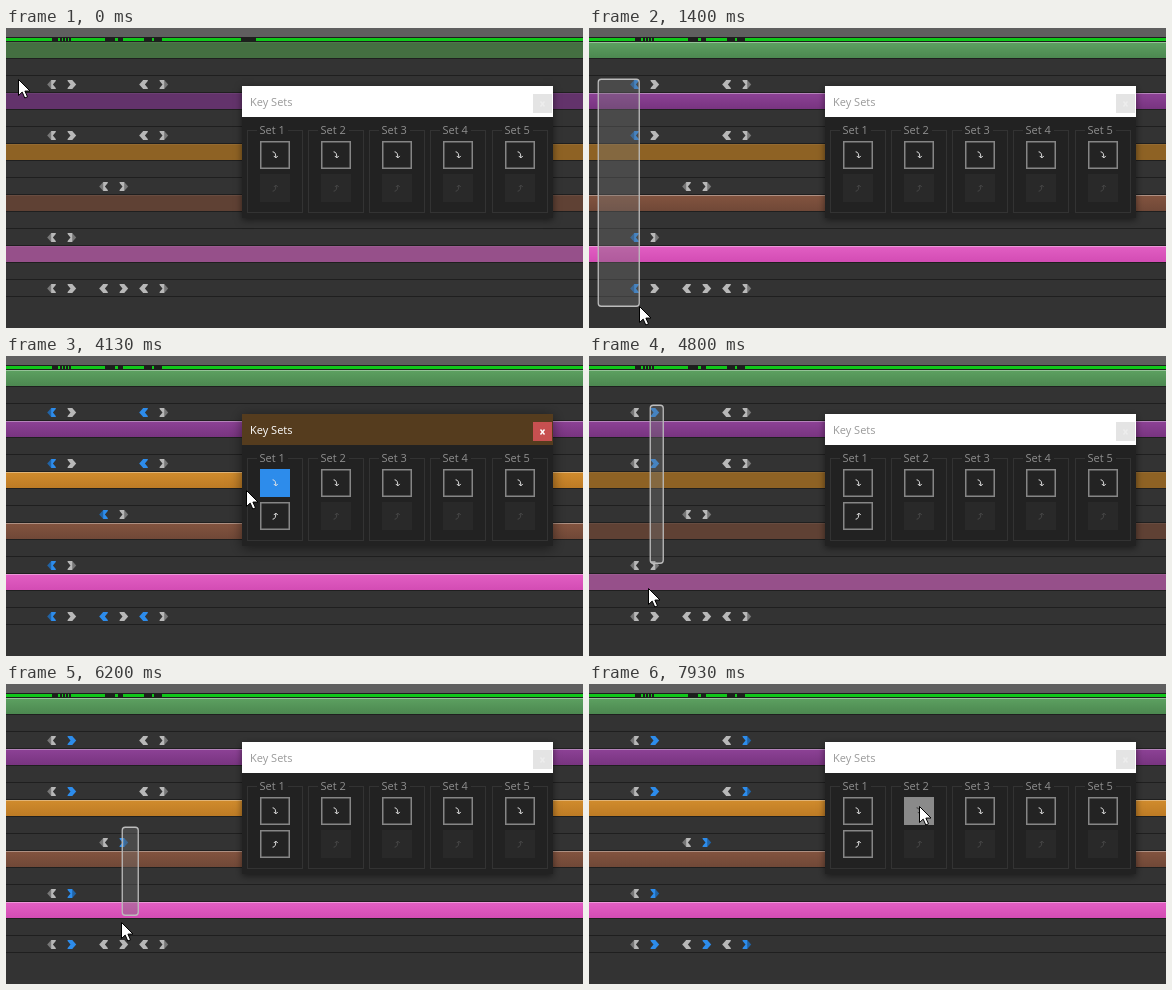
These frames come from a looping animation (577 px wide and 300 px high, 8000 ms). An HTML page with a canvas:

```html
<!DOCTYPE html>
<html lang="en">
<head>
<meta charset="utf-8">
<title>Key Sets</title>
<style>
html, body { margin: 0; width: 100%; height: 100%; overflow: hidden; background: #333; }
canvas { display: block; }
</style>
</head>
<body>
<canvas id="stage" width="577" height="300"></canvas>
<script>
const ctx = document.getElementById('stage').getContext('2d');
const LOOP = 8000, STEP = 1000 / 15, LAG = 40;
const PRESS = 3925, CLEAR = 4460;
const BLUE = '#2d8ceb', FONT = '11px "Open Sans", "Noto Sans", sans-serif';

// Three in/out key pairs; each layer uses some of them
const PAIRS = [[46, 65], [98, 117], [138, 157]];
const layer = (dim, top, bottom, ...pairs) =>
  ({ dim, top, bottom, keys: pairs.flatMap(p => PAIRS[p]) });
const LAYERS = [
  layer('#446f41', '#5da161', '#4c8850', 0, 2),
  layer('#63336b', '#8d4296', '#783480', 0, 2),
  layer('#8e6224', '#d18c2d', '#bd7b25', 1),
  layer('#5f4134', '#83543f', '#704837', 0),
  layer('#96508a', '#e25fc3', '#d34cb4', 0, 1, 2)
];

// Eased cursor moves; a drag also holds a marquee until its release
const move = (from, to, x, y, release) => ({ from, to, x, y, release });
const MOVES = [
  move(130, 330, 9, 51), move(330, 1300, 50, 278, 1470),
  move(1470, 1700, 86, 142), move(1700, 1930, 110, 274, 2195),
  move(2200, 2480, 124, 51), move(2480, 2933, 138, 271, 3065),
  move(3070, 3750, 267, 128), move(3930, 4133, 240, 134),
  move(4133, 4333, 74, 49), move(4467, 4930, 56, 276, 5000),
  move(5000, 5400, 142, 161), move(5400, 5600, 132, 143),
  move(5600, 6467, 110, 266, 6660), move(6667, 6880, 179, 278),
  move(6880, 7067, 151, 103, 7530), move(7080, 7400, 151, 42),
  move(7530, 7800, 360, 105), move(7800, 7930, 330, 122)
];
const DRAGS = MOVES.filter(m => m.release);

function cursorAt(t) {
  let x = 12, y = 51;
  for (const m of MOVES) {
    if (t <= m.from) break;
    const p = Math.min(1, (t - m.from) / (m.to - m.from));
    const k = p * p * (3 - 2 * p);
    x += (m.x - x) * k;
    y += (m.y - y) * k;
  }
  return [x, y];
}

function dragBox({ from, release }, t) {
  const [x, y] = cursorAt(from);
  const [u, v] = cursorAt(Math.max(from, Math.min(t, release) - LAG));
  return { x0: Math.min(x, u), x1: Math.max(x, u), y0: Math.min(y, v), y1: Math.max(y, v) };
}

function rect(x, y, w, h, fill) {
  ctx.fillStyle = fill;
  ctx.fillRect(x, y, w, h);
}

function frame(x, y, w, h, color, line = 1) {
  ctx.strokeStyle = color;
  ctx.lineWidth = line;
  ctx.strokeRect(x + line / 2, y + line / 2, w - line, h - line);
}

function poly(points, fill) {
  ctx.beginPath();
  points.forEach(([x, y]) => ctx.lineTo(x, y));
  ctx.closePath();
  ctx.fillStyle = fill;
  ctx.fill();
}

function drawKey(x, y, flip, outer, lit) {
  const bright = lit ? BLUE : '#b8b8b8', dim = lit ? '#2163a5' : '#777';
  ctx.save();
  ctx.translate(x + .2, y + .5);
  if (flip) ctx.scale(-1, 1);
  poly([[-5, 0], [-1, -4.5], [0, -4.5], [0, 4.5], [-1, 4.5]], outer ? dim : bright);
  poly([[-1, -4.5], [3.6, -4.5], [3.6, -3.5], [.7, 0], [3.6, 3.5], [3.6, 4.5], [-1, 4.5]], bright);
  ctx.restore();
}

function drawRuler(t) {
  const gap = (x, w) => rect(x, 10, w, 4, '#1c201c');
  rect(0, 0, 577, 9, '#5f5f5f');
  rect(0, 9, 577, 5, '#1e1e1e');
  rect(0, 10, 577, 3, '#10c81a');
  gap(46, 6);
  for (let x = 54; x < 65; x += 3) gap(x, 2);
  gap(99, 10);
  gap(112, 5);
  gap(138, 8);
  gap(148, 8);
  if (t < 400) gap(235, 15);
}

function drawLayers(boxes) {
  rect(0, 14, 577, 286, '#333');
  LAYERS.forEach(({ dim, top, bottom, keys }, row) => {
    const y = 14 + 51 * row, ky = y + 42;
    const lit = keys.map(x => boxes.some(b =>
      x >= b.x0 && x - 2 <= b.x1 && ky >= b.y0 && ky <= b.y1));
    const on = lit.includes(true);
    let fill = dim;
    if (on) {
      fill = ctx.createLinearGradient(0, y, 0, y + 16);
      fill.addColorStop(0, top);
      fill.addColorStop(1, bottom);
    }
    rect(0, y, 577, 16, fill);
    rect(0, y, 577, 1, `rgba(255,255,255,${on ? .35 : .06})`);
    for (let d = 16; d < 51; d += 17) rect(0, y + d, 577, 1, '#1f1f1f');
    keys.forEach((x, i) => drawKey(x, ky, i % 2, i === 0 || i === keys.length - 1, lit[i]));
  });
}

function drawMarquee({ x0, y0, x1, y1 }) {
  ctx.beginPath();
  ctx.roundRect(Math.round(x0) + .25, Math.round(y0) + .25,
    Math.round(x1 - x0), Math.round(y1 - y0), 3);
  ctx.fillStyle = 'rgba(115,115,115,.36)';
  ctx.fill();
  ctx.strokeStyle = '#bcbcbc';
  ctx.lineWidth = 1.3;
  ctx.stroke();
}

function drawArrow(x, y, up, color) {
  ctx.save();
  ctx.translate(x, y);
  ctx.scale(.8, up ? -.8 : .8);
  ctx.strokeStyle = color;
  ctx.lineWidth = 1.2;
  ctx.beginPath();
  ctx.moveTo(-3, -4);
  ctx.quadraticCurveTo(1, -4, 1, 3);
  ctx.moveTo(-1.5, 1.2);
  ctx.lineTo(1, 3.7);
  ctx.lineTo(3.5, 1.2);
  ctx.stroke();
  ctx.restore();
}

function drawButton(x, y, up, enabled, pressed, [cx, cy]) {
  const hover = cx >= x && cx < x + 30 && cy >= y && cy < y + 28;
  rect(x, y, 30, 28, !enabled ? '#292929' : pressed ? BLUE : hover ? '#8a8a8a' : '#232323');
  if (enabled && !pressed && !hover) frame(x, y, 30, 28, '#868686', 1.5);
  drawArrow(x + 15, y + 14, up, !enabled ? '#484848' : hover && !pressed ? '#333' : '#e4e4e4');
}

function drawPanel(t, cursor) {
  const active = t >= PRESS && t < CLEAR;
  ctx.save();
  ctx.shadowColor = 'rgba(0,0,0,.5)';
  ctx.shadowBlur = active ? 12 : 7;
  ctx.shadowOffsetY = 2;
  rect(236, 58, 311, 132, '#222');
  ctx.restore();
  rect(236, 58, 311, 31, active ? '#553c1e' : '#fff');
  rect(527, 66, 19, 19, active ? '#c75050' : '#e4e4e4');
  ctx.strokeStyle = active ? '#fff' : '#ededed';
  ctx.lineWidth = 1.4;
  ctx.beginPath();
  ctx.moveTo(534.5, 73.5); ctx.lineTo(538.5, 78.5);
  ctx.moveTo(538.5, 73.5); ctx.lineTo(534.5, 78.5);
  ctx.stroke();

  ctx.font = FONT;
  ctx.fillStyle = active ? '#fff' : '#999';
  ctx.fillText('Key Sets', 244, 78);

  for (let i = 0; i < 5; i++) {
    const x = Math.floor(241 + 61.3 * i);
    frame(x, 102, 56, 83, '#333');
    rect(x + 10, 100, 31, 5, '#222');
    ctx.fillStyle = '#909090';
    ctx.fillText('Set ' + (i + 1), x + 12.5, 106);
    drawButton(x + 13, 113, false, true, i === 0 && active, cursor);
    drawButton(x + 13, 146, true, i === 0 && t >= PRESS, false, cursor);
  }
}

function drawCursor([x, y]) {
  ctx.save();
  ctx.translate(Math.round(x) + .5, Math.round(y) + .5);
  poly([[0, 0], [0, 16], [3.7, 12.6], [6.3, 18.5], [9, 17.3], [6.4, 11.6], [11.5, 11.5]], '#fff');
  ctx.strokeStyle = '#000';
  ctx.lineWidth = 1;
  ctx.stroke();
  ctx.restore();
}

function draw(t) {
  const cursor = cursorAt(t);
  const made = DRAGS.filter(d => d.from <= t && (t < CLEAR || d.from >= CLEAR));
  const held = made.find(d => t < d.release);
  drawRuler(t);
  drawLayers(made.map(d => dragBox(d, t)));
  if (held) drawMarquee(dragBox(held, t));
  drawPanel(t, cursor);
  drawCursor(cursor);
}

const start = performance.now();
function tick() {
  const t = (performance.now() - start) % LOOP;
  draw(Math.min(119, Math.floor((t + 5) / STEP)) * STEP);
  requestAnimationFrame(tick);
}
tick();
</script>
</body>
</html>
```
